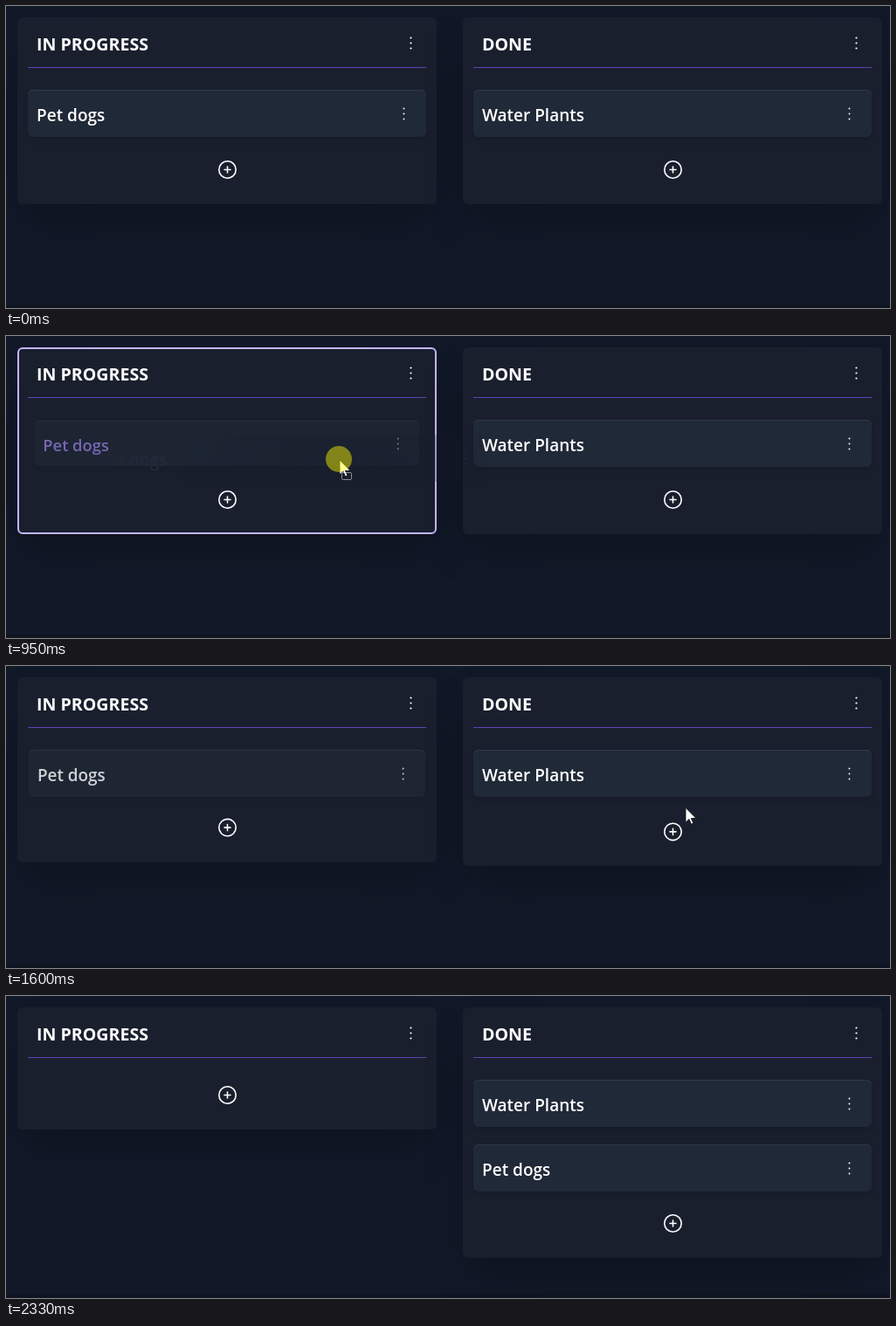
These frames come from a looping animation (1012 by 346 pixels, 3130 ms). An HTML page:

```html
<!DOCTYPE html>
<html lang="en">
<head>
<meta charset="utf-8">
<title>Task board</title>
<style>
  html, body { margin: 0; width: 100%; height: 100%; overflow: hidden; background: #111827; }
  #stage { position: absolute; inset: 0; overflow: hidden; }
  #stage div, #stage > svg { position: absolute; }
  svg { display: block; overflow: visible; position: absolute; left: 0; top: 0; }
  text { font-family: "Open Sans", "Noto Sans", sans-serif; }
  .col {
    top: 13px; width: 480px; height: 214px; border-radius: 6px; background: #191f2d;
    box-shadow: 0 25px 50px -12px rgba(0, 0, 0, .25);
  }
  .col.over { outline: 2px solid #c4b5fd; outline-offset: -2px; }
  .col text { font-size: 19.6px; font-weight: 700; fill: #fff; }
  .card {
    width: 456px; height: 54px; border-radius: 6px; background: #202937;
    box-shadow: inset 0 1px #303947, 0 4px 6px -1px rgba(0, 0, 0, .1), 0 2px 4px -2px rgba(0, 0, 0, .1);
  }
  .card text { font-size: 19px; font-weight: 600; fill: #fff; }
  .card.hover text { fill: #a78bfa; }
  #ghost { background: none; box-shadow: none; -webkit-mask: linear-gradient(90deg, transparent, #000 75px); mask: linear-gradient(90deg, transparent, #000 75px); }
  #ghost text { fill: #242a39; }
  #ghost circle { fill: #2a3040; }
  #strip { left: 0; right: 0; top: 342px; height: 4px; background: #0f1520; }
</style>
</head>
<body>
<div id="stage"></div>
<script>
const LOOP = 3130, TICK = 1000 / 15;
const PRESS = 11, DRAG = 13, DROP = 24, EXIT = 35;
const SETTLE = 1568, MOVE = 250, ADD = 375;

// Pointer tip: tick, x, y
const PATH = [
  [3, 822, 317], [4, 650, 258], [5, 472, 198], [6, 340, 160], [7, 312, 143],
  [8, 302, 132], [9, 298, 126], [10, 297, 125], [12, 297, 125], [13, 310, 128],
  [14, 382, 142], [15, 482, 157], [16, 670, 167], [17, 748, 164], [18, 775, 163],
  [21, 775, 163], [22, 778, 162], [29, 778, 163], [30, 777, 172], [31, 773, 190],
  [32, 763, 228], [33, 750, 280], [34, 737, 325], [35, 728, 346]
];

const dots = (x, y, r) => [-6, 0, 6].map(d =>
  `<circle cx="${x}" cy="${y + d}" r="${r}" fill="#fff"/>`).join("");

const column = (id, x, title) => `
  <div class="col" id="${id}" style="left:${x}px">
    <svg width="480" height="60">
      <text x="22" y="38">${title}</text>${dots(450.5, 29.5, 1.1)}
      <path d="M12 57.5H468" stroke="#5f45b4"/>
    </svg>
    <svg class="plus" width="480" height="214">
      <g fill="none" stroke="#fff" stroke-width="1.6" stroke-linecap="round">
        <circle cx="240.5" cy="174.5" r="9.7"/><path d="M237 174.5h7M240.5 171v7"/>
      </g>
    </svg>
  </div>`;

const card = (id, x, y, label) => `
  <div class="card" id="${id}" style="left:${x}px;top:${y}px">
    <svg width="456" height="54"><text x="10" y="36">${label}</text>${dots(430.5, 27.5, .95)}</svg>
  </div>`;

const stage = document.getElementById("stage");
stage.innerHTML =
  `<div id="strip"></div>` +
  column("left", 13, "IN PROGRESS") + column("right", 523, "DONE") +
  card("pet", 25, 96, "Pet dogs") + card("water", 535, 96, "Water Plants") +
  card("added", 535, 169.5, "Pet dogs") + card("ghost", 25, 96, "Pet dogs") + `
  <svg id="pointer" width="1012" height="346">
    <g stroke="#10131c" stroke-width=".9" fill="#fff" stroke-linejoin="round">
      <path id="arrow" d="M0 0V17L4 13.2L6.6 19L9 18L6.4 12.3H12Z"/>
      <path id="hand" d="M-1.6 14V1.6a1.6 1.6 0 0 1 3.2 0V7.5a1.5 1.5 0 0 1 3 .3a1.5 1.5 0 0 1 2.9 .5a1.4 1.4 0 0 1 2.8 .6V15q0 3-2 5.5V23H.2V21.5L-5 14q-1-2.4 1-2.4Z"/>
    </g>
    <rect id="parcel" x="2.5" y="14.5" width="11" height="8" rx="1" fill="none" stroke="#fff" stroke-dasharray="1 1"/>
    <circle id="press" cx="-1" cy="-1" r="15" fill="#fffa00" fill-opacity=".46"/>
  </svg>`;

const el = Object.fromEntries([...stage.querySelectorAll("[id]")].map(n => [n.id, n]));
const show = (node, on) => { node.style.display = on ? "" : "none"; };
const clamp = v => Math.min(1, Math.max(0, v));
const mix = (a, b, p) => a + (b - a) * p;

// Timing curve with control points (x1, 0) and (x2, 1)
function ease(x1, x2, p) {
  const at = (a, b, s) => 3 * a * s * (1 - s) ** 2 + 3 * b * s * s * (1 - s) + s ** 3;
  let lo = 0, hi = 1;
  for (let i = 0; i < 24; i++) {
    const mid = (lo + hi) / 2;
    if (at(x1, x2, mid) < p) lo = mid; else hi = mid;
  }
  return at(0, 1, lo);
}

function tipAt(n) {
  const i = Math.max(1, PATH.findIndex(k => k[0] >= n));
  const [a, b] = [PATH[i - 1], PATH[i]];
  const p = clamp((n - a[0]) / (b[0] - a[0]));
  return [mix(a[1], b[1], p), mix(a[2], b[2], p)];
}

function pose(node, opacity, scale) {
  node.style.opacity = opacity;
  node.style.transform = `scale(${scale})`;
}

function sizeColumn(node, grow) {
  node.style.height = 214 + grow + "px";
  node.querySelector(".plus").style.transform = `translateY(${grow}px)`;
}

function draw(ms) {
  const n = Math.min(EXIT, Math.floor((ms + 4) / TICK)), t = n * TICK;
  const visible = n >= 3 && n < EXIT;
  const [x, y] = tipAt(Math.min(EXIT, Math.max(3, n)));
  const dragging = n >= DRAG && n < DROP;
  const dropped = n >= DROP;
  const hoverPet = n >= 7 && !dropped;
  const hoverAdded = visible && n >= 30 && y > 169 && y < 223;

  const moved = ease(.42, .58, clamp((t - SETTLE) / MOVE));
  sizeColumn(el.left, -74 * moved);
  sizeColumn(el.right, 73 * moved);
  el.left.classList.toggle("over", dragging && x < 493);
  el.right.classList.toggle("over", dragging && x > 523);

  if (dropped) {
    const gone = ease(0, .58, clamp((t - SETTLE) / MOVE));
    pose(el.pet, 1 - gone, mix(1, .98, gone));
  } else {
    const lift = clamp((n - DRAG + 1) / 3);
    pose(el.pet, mix(1, .5, lift), mix(1, .95, lift));
  }
  el.pet.classList.toggle("hover", hoverPet);

  const entry = clamp(ease(.42, 1, clamp((t - SETTLE) / ADD)) * 2 - 1);
  pose(el.added, entry, mix(.98, 1, entry));
  el.added.classList.toggle("hover", hoverAdded);

  show(el.ghost, dragging);
  if (dragging) {
    const lag = n < 18 ? 16 : 0;
    el.ghost.style.transform = `translate(${x - 295 - lag}px, ${y - 125}px)`;
    el.ghost.style.background =
      `radial-gradient(circle 180px at ${270 + lag}px 29px, rgba(24,30,44,.55), rgba(24,30,44,0))`;
  }

  const hand = (hoverPet && !dragging) || hoverAdded;
  show(el.pointer, visible);
  show(el.hand, hand);
  show(el.arrow, !hand);
  show(el.parcel, dragging);
  show(el.press, n >= PRESS && !dropped);
  el.pointer.style.transform = `translate(${x}px, ${y}px)`;
}

const start = performance.now();
function frame() {
  draw((performance.now() - start) % LOOP);
  requestAnimationFrame(frame);
}
frame();
</script>
</body>
</html>
```
